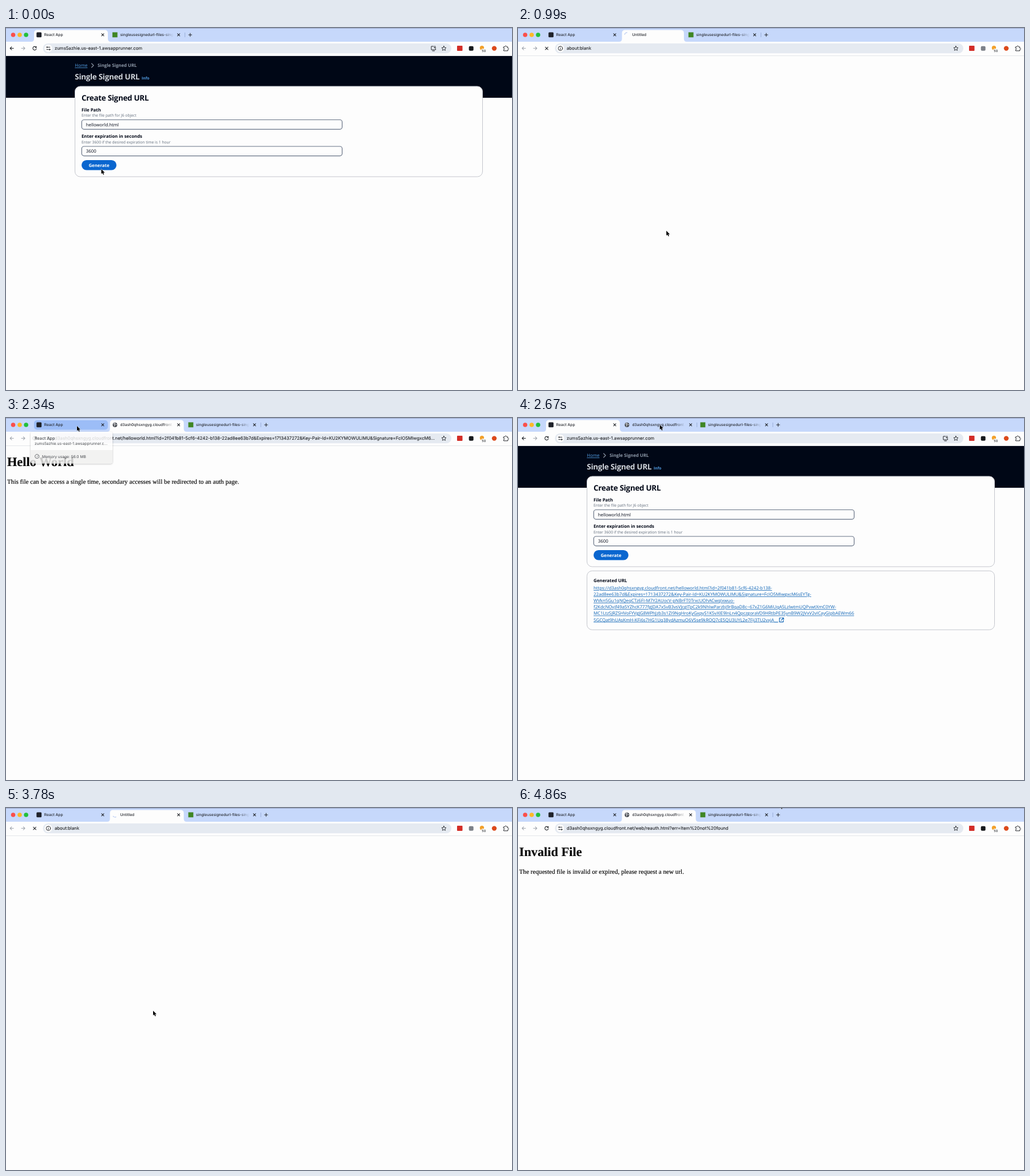
An HTML page for the animation above (4.89 s loop, 884 px wide and 633 px high).

```html
<!DOCTYPE html>
<html lang="en">
<head>
<meta charset="utf-8">
<title>Single Signed URL</title>
<style>
  html, body { margin: 0; width: 100%; height: 100%; overflow: hidden; background: #fdfdfd; }
  svg { display: block; }
  text { text-rendering: geometricPrecision; white-space: pre; }
  .chrome { font: 7.75px Inter, sans-serif; fill: #1f2024; stroke: #1f2024; stroke-width: .1; }
  .tab { font: 500 6.65px Inter, sans-serif; fill: #25282e; }
  .fade { fill: url(#fade); }
  .body { font: 7.8px "Open Sans", sans-serif; fill: #000716; }
  .bold { font-weight: 700; }
  .hint { font-size: 6.75px; fill: #5f6b7a; }
  .title { font: 700 13.4px "Open Sans", sans-serif; letter-spacing: -.02em; fill: #000716; }
  .serif { font: 11.15px "Liberation Serif", serif; fill: #000; stroke: #000; stroke-width: .15; }
  .heading { font-weight: 700; font-size: 22.3px; }
  .line { fill: none; stroke: #24272c; stroke-width: 1.1; stroke-linecap: round; stroke-linejoin: round; }
  .box { fill: #fdfdfd; stroke: #c4c6cd; }
  .input { fill: #fdfdfd; stroke: #667285; stroke-width: 1.2; }
  #link { fill: #0a62b5; }
  .pale { stroke: #a3a8b0; }
</style>
</head>
<body>
<svg width="884" height="633" viewBox="0 0 884 633">
  <defs>
    <linearGradient id="fade" gradientUnits="userSpaceOnUse" x1="93" x2="111" y1="0" y2="0">
      <stop stop-color="#25282e"/><stop offset="1" stop-color="#25282e" stop-opacity="0"/>
    </linearGradient>
    <filter id="shadow"><feDropShadow dx="0" dy="1" stdDeviation="1.5" flood-opacity=".3"/></filter>
    <path id="close" class="line" d="M118 9.8l4 4m0-4l-4 4"/>
    <g id="globe"><circle cx="8.8" cy="12" r="4" fill="#484c53"/><path d="M6 10.5l2.5-1.5 1 1.6-2 1.2 1 1.5-1 1.5M10 12l2-.5" fill="none" stroke="#fff" stroke-width="1"/></g>
  </defs>

  <g id="app">
    <path d="M0 49h884v73H0z" fill="#000716"/>
    <g class="body">
      <text x="120.3" y="68.3" style="fill:#539fe5;text-decoration:underline">Home</text>
      <path d="M149.5 62l3.5 3.5-3.5 3.5" class="line" style="stroke:#8d99a8"/>
      <text x="160" y="68.3" class="bold" style="fill:#8d99a8">Single Signed URL</text>
      <text x="120.3" y="89.5" class="title" style="fill:#d1d5db">Single Signed URL</text>
      <text x="237" y="89.5" class="bold hint" style="fill:#539fe5">Info</text>
      <rect x="120.5" y="102" width="712" height="158" rx="9" class="box"/>
      <text x="132" y="127.3" class="title">Create Signed URL</text>
      <text x="132" y="145.7" class="bold">File Path</text>
      <text x="132" y="155.2" class="hint">Enter the file path for J6 object</text>
      <rect x="132.3" y="160.5" width="455" height="16.6" rx="4" class="input"/>
      <text x="139.8" y="171.8">helloworld.html</text>
      <text x="132" y="192.3" class="bold">Enter expiration in seconds</text>
      <text x="132" y="201.8" class="hint">Enter 3600 if the desired expiration time is 1 hour</text>
      <rect x="132.3" y="207" width="455" height="16.6" rx="4" class="input"/>
      <text x="139.8" y="218.4">3600</text>
      <rect x="132" y="231" width="61" height="17.6" rx="8.8" fill="#0a66cf"/>
      <text x="162.5" y="242.6" text-anchor="middle" class="bold" style="fill:#fff">Generate</text>
      <g id="panel">
        <rect x="120.5" y="267.3" width="712" height="103" rx="9" class="box"/>
        <text x="132" y="287" class="bold">Generated URL</text>
        <g id="link"></g>
        <path d="M459.5 349.8h-2.8v6.8h6.8v-2.8M461 349.5h3v3M464 349.5l-4.3 4.3" class="line" style="stroke:#0a62b5"/>
      </g>
    </g>
  </g>

  <g id="hello" class="serif">
    <text x="2" y="84" class="heading">Hello World</text>
    <text x="2" y="114.7">This file can be access a single time, secondary accesses will be redirected to an auth page.</text>
  </g>
  <g id="invalid" class="serif">
    <text x="2" y="84" class="heading">Invalid File</text>
    <text x="2" y="114.7">The requested file is invalid or expired, please request a new url.</text>
  </g>

  <path d="M0 0h884v24H0z" fill="#c6d8fb"/>
  <path d="M0 .4h884" stroke="#8996b3" stroke-width=".8"/>
  <path d="M0 24h884v24.5H0z" fill="#fdfdfd"/>
  <path d="M0 48.5h884" stroke="#e4e6ea"/>
  <circle cx="12.5" cy="12" r="3.8" fill="#fb4f4b"/>
  <circle cx="23.9" cy="12" r="3.8" fill="#fdb827"/>
  <circle cx="35.1" cy="12" r="3.8" fill="#22c03b"/>
  <rect id="hover" x="49" y="4" width="129" height="16.5" rx="5" fill="#9cbdf7"/>
  <path id="active" fill="#fdfdfd"/>
  <svg x="49" width="130" height="24">
    <rect x="4.3" y="7.5" width="8.8" height="8.8" rx="1.5" fill="#20232a"/>
    <text x="17.8" y="14.2" class="tab">React App</text>
    <use href="#close"/>
  </svg>
  <svg id="second" x="181.6" height="24">
    <g id="loaded"><use href="#globe"/><text x="17.8" y="14.2" class="tab fade">d3ash0qhsxngyg.cloudfront.net</text></g>
    <g id="untitled">
      <path id="spinner" d="M8.8 8a4 4 0 0 1 4 4" fill="none" stroke="#a3bbee" stroke-width="1"/>
      <text x="17.8" y="14.2" class="tab">Untitled</text>
    </g>
    <use href="#close"/>
  </svg>
  <path id="divider" d="M0 8v8" stroke="#8fa5cf" stroke-width=".8"/>
  <g id="last">
    <rect x="4.3" y="7.5" width="8.8" height="8.8" fill="#3f8624"/>
    <text x="17.8" y="14.2" class="tab fade">singleusesignedurl-files-single</text>
    <use href="#close"/>
    <path d="M131 8v8" stroke="#8fa5cf" stroke-width=".8"/>
    <path d="M137.4 12h5.6m-2.8-2.8v5.6" class="line" style="stroke-width:1"/>
  </g>

  <path id="back" class="line" d="M13.2 35.5H7.2m2.7-2.7l-2.7 2.7 2.7 2.7"/>
  <path class="line pale" d="M27 35.5h6m-2.7-2.7l2.7 2.7-2.7 2.7"/>
  <path id="reload" class="line" d="M52.6 33.7a3.1 3.1 0 1 0 .5 2.3M53 32.3v1.8h-1.8"/>
  <path id="stop" class="line" d="M47.8 33.3l4.6 4.6m0-4.6l-4.6 4.6"/>
  <rect x="64.5" y="27" width="713.5" height="17.3" rx="8.6" fill="#e5eaf1"/>
  <circle cx="74" cy="35.6" r="6.7" fill="#fdfdfd"/>
  <g id="tune" class="line" style="stroke-width:1"><path d="M73.8 33.6h3M71 37.6h3"/><circle cx="71.8" cy="33.6" r="1"/><circle cx="76.2" cy="37.6" r="1"/></g>
  <g id="about" class="line" style="stroke-width:1"><circle cx="74" cy="35.6" r="3.7"/><path d="M74 35.5v2M74 33.6v.1"/></g>
  <text id="address" x="85" y="38.3" class="chrome"></text>
  <path id="install" class="line" style="stroke-width:1" d="M747 32h-4v6h7.6v-2M745 40h3.6M749.3 31.4v3.7m-1.6-1.6l1.6 1.6 1.6-1.6"/>
  <path class="line" style="stroke-width:.9" d="M765 31.6l1.2 2.6 2.8.3-2.1 1.9.6 2.8-2.5-1.4-2.5 1.4.6-2.8-2.1-1.9 2.8-.3z"/>
  <rect x="788" y="31" width="9.5" height="9" rx="1" fill="#d32d27"/>
  <rect id="extension" x="808.7" y="31.7" width="8" height="8" rx="2"/>
  <circle cx="831.5" cy="34.8" r="3.7" fill="#f2a12c"/>
  <rect x="830.5" y="36.2" width="8.6" height="6.4" rx="1.5" fill="#fdfdfd"/>
  <text x="834.8" y="41.5" text-anchor="middle" class="tab" style="font-size:5.6px">50</text>
  <circle cx="853" cy="35.6" r="4.2" fill="#dc4a1c"/>
  <path class="line" style="stroke-width:1" d="M869.5 33h2.2c0-2.4 2.8-2.4 2.8 0h2.2v2.3c2 0 2 2.6 0 2.6v2h-7.2v-2.2c2-.3 2-2.1 0-2.4z"/>

  <g id="card">
    <rect x="43" y="24" width="143" height="55.5" rx="4" fill="#fdfdfd" filter="url(#shadow)"/>
    <path d="M43 56h143v19.5a4 4 0 0 1-4 4H47a4 4 0 0 1-4-4z" fill="#f0f0ef"/>
    <text x="50" y="37.6" class="tab" style="font-size:7.2px">React App</text>
    <text x="50" y="47.4" class="tab" style="font-weight:400">zums5azhie.us-east-1.awsapprunner.c...</text>
    <path class="line" style="stroke-width:.8" d="M52 70a3.6 3.6 0 1 1 4.4 0zM54.2 67.5l1.5-1.5"/>
    <text x="63" y="69.6" class="tab" style="font-weight:400">Memory usage: 56.0 MB</text>
  </g>

  <path id="cursor" d="M0 0v8.4l1.9-1.7 1.5 3.1 1.4-.6-1.4-3h2.6z" stroke="#fff" stroke-width=".8" paint-order="stroke"/>
</svg>

<script>
const LOOP = 4890, STEP = 30, TAB_PITCH = 132.6;
const $ = id => document.getElementById(id);
const show = (id, on) => { $(id).style.display = on ? '' : 'none'; };
const clamp01 = v => Math.max(0, Math.min(1, v));
const ramp = (t, from, to) => clamp01((t - from) / (to - from));
const smooth = p => p * p * (3 - 2 * p);

const urlLines = [
  'https://d3ash0qhsxngyg.cloudfront.net/helloworld.html?id=2f041b81-5cf6-4242-b138-',
  '22ad8ee63b7d&Expires=1713437272&Key-Pair-Id=KU2KYMOWULIMU&Signature=FcIO5MIwgxcM6sEYTg-',
  'WVkn5Gu1qNQeqCTz6FI-M7Y2AUocV-pNBrFT0TrxcUOhACwqIxwuo-',
  'f2KdcNOvjf49a5YZhcK777fgJDA7x5vB3vsVJcgITpC2k9NhIwParzbj9rBqaD8c~67xZ1G6MiUqA5LzlwtmUQPvwtXmC0YW-',
  'MC1LtzSJRZSHVoFYVgJG8WPhJzb3s1ZI9NqHroKyGxpyS1K5vXIE9lnLn4QpczgoraVD9HRtbPE35ynB9W2JVxV2vICayGIpbAEWm66',
  '5GCQat9hUAsKmH-KFi6s7HG1Uq38ydAzmuO6V5se9kROQ7cE5QU3UYL2e7Fij3TU2vxjA__'
];
urlLines.forEach((line, i) => {
  const text = document.createElementNS('http://www.w3.org/2000/svg', 'text');
  text.setAttribute('x', 132);
  text.setAttribute('y', 300 + i * 11.12);
  text.textContent = line;
  $('link').append(text);
});

const addresses = {
  app: 'zums5azhie.us-east-1.awsapprunner.com',
  blank: 'about:blank',
  hello: (urlLines[0] + urlLines[1]).slice(8).replace(/sEYTg-$/, '...'),
  invalid: 'd3ash0qhsxngyg.cloudfront.net/web/reauth.html?err=Item%20not%20found'
};

// [start time, page]
const pages = [[0, 'app'], [930, 'blank'], [1230, 'hello'], [2430, 'app'], [3630, 'blank'], [4050, 'invalid']];

// [time, x, y] of the pointer tip
const pointer = [
  [0, 166.5, 246.7], [330, 166.5, 244], [660, 250, 361.7], [810, 257, 354.4], [960, 257, 354.4],
  [1500, 503, 369], [1950, 503, 369], [2310, 124, 14], [2460, 124, 14], [2790, 301, 11],
  [2970, 301, 11], [3090, 208, 60], [3450, 257, 354.4], [4320, 257, 354.4], [4860, 457, -8]
];

function pointerAt(t) {
  const i = pointer.findLastIndex(k => k[0] <= t);
  const a = pointer[i], b = pointer[i + 1] || a;
  const p = a === b ? 0 : smooth(ramp(t, a[0], b[0]));
  return [a[1] + (b[1] - a[1]) * p, a[2] + (b[2] - a[2]) * p];
}

function tabShape(x, w) {
  return `M${x - 5} 24q5 0 5-5V9q0-5.5 5.5-5.5H${x + w - 5.5}q5.5 0 5.5 5.5v10q0 5 5 5z`;
}

function render(t) {
  const page = pages.findLast(p => p[0] <= t)[1];
  const app = page === 'app', blank = page === 'blank';
  const [x, y] = pointerAt(t);
  const opened = smooth(ramp(t, 900, 1020)) - smooth(ramp(t, 3000, 3126)) + smooth(ramp(t, 3600, 3720));
  const width = TAB_PITCH * opened;

  for (const id of ['app', 'hello', 'invalid']) show(id, page === id);
  show('panel', t >= 390);
  $('link').style.textDecoration = t >= 720 ? 'underline' : 'none';

  $('active').setAttribute('d', app ? tabShape(49, 129) : tabShape(181.6, Math.max(12, width - 3.6)));
  $('second').setAttribute('width', Math.max(0, width - 7));
  $('last').setAttribute('transform', `translate(${181.6 + width})`);
  $('divider').setAttribute('transform', `translate(${180 + width})`);
  show('divider', app && width > 8);
  show('hover', !app && x > 49 && x < 178 && y < 24);
  show('loaded', !blank);
  show('untitled', blank);
  $('spinner').setAttribute('transform', `rotate(${(t - 3780) * .6 + 150} 8.8 12)`);

  $('address').textContent = addresses[page];
  $('back').classList.toggle('pale', !app);
  $('extension').setAttribute('fill', blank ? '#7c8088' : '#17191c');
  show('install', app);
  show('reload', !blank);
  show('stop', blank);
  show('tune', !blank);
  show('about', blank);

  $('card').setAttribute('opacity', .84 * ramp(t, 2250, 2340));
  show('card', t >= 2250 && t < 2430);
  $('cursor').setAttribute('transform', `translate(${x} ${y})`);
}

function frame() {
  const t = performance.now() % LOOP;
  render(Math.floor(t / STEP) * STEP);
  requestAnimationFrame(frame);
}
frame();
</script>
</body>
</html>
```
